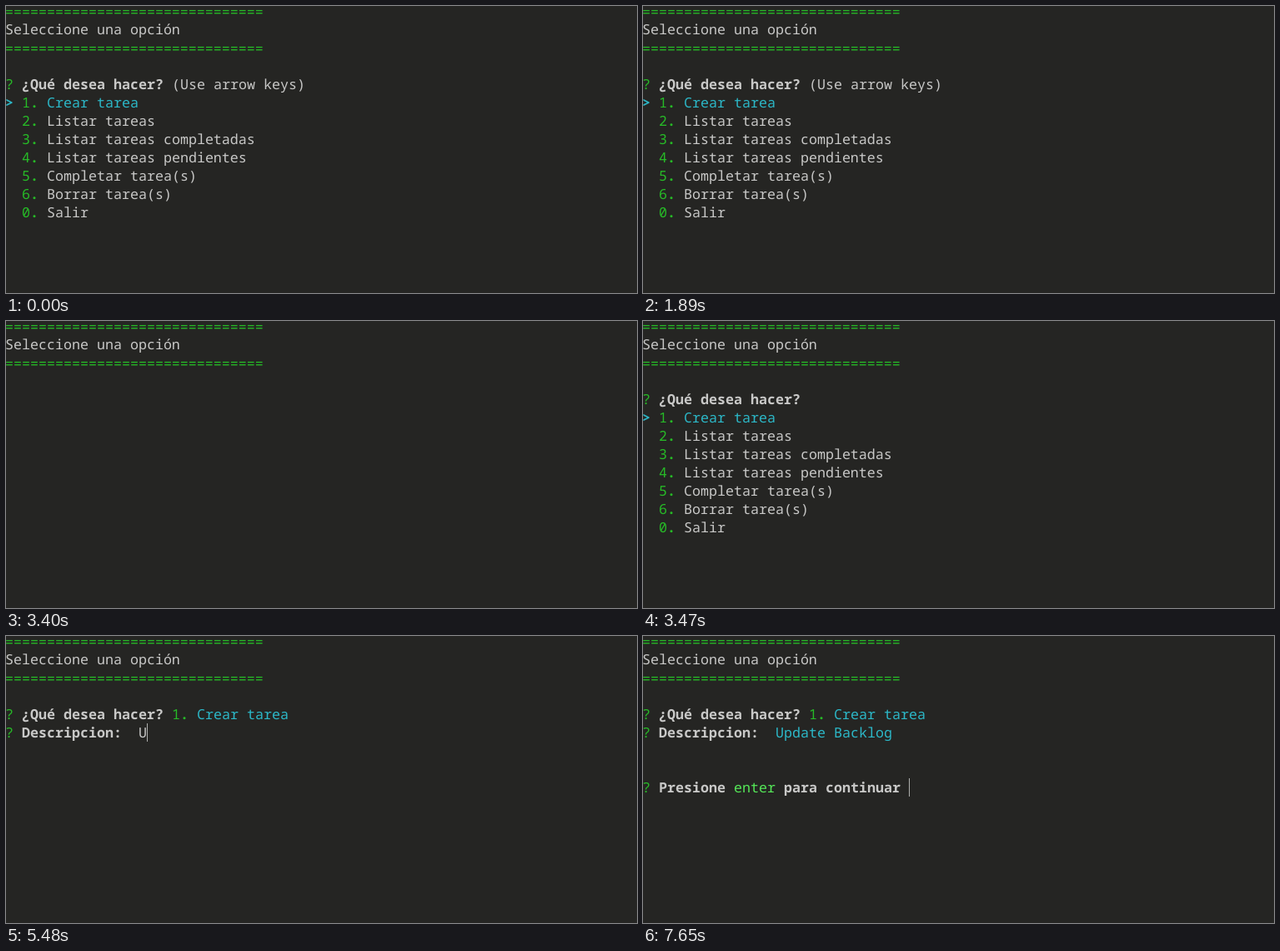
An HTML page that plays this animation: 757 by 345 pixels, repeating every 8000 ms.

```html
<!DOCTYPE html>
<html lang="es">
<head>
<meta charset="utf-8">
<title>Tareas</title>
<style>
  html, body { margin: 0; width: 100%; height: 100%; overflow: hidden; background: #252523; }
  svg { display: block; width: 757px; height: 345px; }
  text { font: 16.667px "Noto Sans Mono", monospace; white-space: pre; text-rendering: geometricPrecision; }
  .fg { fill: #c8c8c7; }
  .bold { fill: #c8c8c7; font-weight: 700; }
  .green { fill: #27bb27; }
  .cyan { fill: #2cb8c8; }
  .bright { fill: #55e858; }
  .strong { font-weight: 700; }
  .medium { font-weight: 500; }
</style>
</head>
<body>
<svg viewBox="0 0 757 345">
  <rect width="757" height="345" fill="#252523"/>
  <g id="screen"></g>
  <rect id="caret" y="105" width="1" height="22" fill="#aeafad"/>
  <circle id="click" cx="544" cy="233" r="12" fill="#8b8a14"/>
  <path id="beam" d="M0 .5h3M4 .5h3M3.5 1v14M0 15.5h3M4 15.5h3" stroke="#e4e4e0" fill="none" shape-rendering="crispEdges"/>
</svg>
<script>
const LOOP = 8000, COL = 10, ROW = 22;
const $ = id => document.getElementById(id);
const screen = $('screen'), caret = $('caret'), click = $('click'), beam = $('beam');

const options = [
  'Crear tarea', 'Listar tareas', 'Listar tareas completadas',
  'Listar tareas pendientes', 'Completar tarea(s)', 'Borrar tarea(s)', 'Salir'
];
const phrase = 'Update Backlog';
const keyTimes = [5480, 5660, 5755, 5850, 5990, 6080, 6170, 6550, 6730, 6835, 6940, 7040, 7220, 7340];

const colX = col => col * COL - 1;
const between = (t, a, b) => t >= a && t < b;
const show = (el, on) => el.setAttribute('visibility', on ? 'visible' : 'hidden');

const run = (row, col, style, text, drop = 0) =>
  `<text class="${style}" x="${colX(col)}" y="${row * ROW + 12 + drop}">${text}</text>`;

const prompt = (row, text) => run(row, 0, 'green', '?') + run(row, 2, 'bold', text);
const rule = row => run(row, 0, 'green', '='.repeat(31), 1);
const number = (row, col, n) => run(row, col, 'green medium', n) + run(row, col + 1, 'green strong', '.');

const header = () => rule(0) + run(1, 0, 'fg', 'Seleccione una opción') + rule(2);

function menu(selected, hint) {
  const items = options.map((name, i) => {
    const row = 5 + i, on = i === selected;
    return (on ? run(row, 0, 'cyan strong', '&gt;') : '') +
      number(row, 2, (i + 1) % options.length) +
      run(row, 5, on ? 'cyan' : 'fg', name);
  });
  return prompt(4, '¿Qué desea hacer?') + (hint ? run(4, 20, 'fg', '(Use arrow keys)') : '') + items.join('');
}

function form(typed, done) {
  return prompt(4, '¿Qué desea hacer?') + number(4, 20, 1) + run(4, 23, 'cyan', options[0]) +
    prompt(5, 'Descripcion:') + run(5, 16, done ? 'cyan' : 'fg', typed) +
    (done ? prompt(8, 'Presione') + run(8, 11, 'bright', 'enter') + run(8, 17, 'bold', 'para continuar') : '');
}

function body(t, typed) {
  if (t < 3020) return menu(0, true);
  if (t < 3400) return menu(1, false);
  if (t < 3470) return '';
  if (t < 4100) return menu(0, false);
  return form(typed, t >= 7650);
}

// The pointer glides in over six sampled positions, then settles by single pixels.
function beamPos(t) {
  if (t >= 1130) return [543, 226];
  if (t >= 880) return [544, 226];
  const left = 1 - Math.min(5, Math.floor((t - 360) / 66)) / 5;
  const ease = left * left;
  return [Math.round(544 + 152 * ease), Math.round(227 + 88 * ease)];
}

let last = '';
function draw(t) {
  const count = keyTimes.filter(k => t >= k).length;
  const html = header() + body(t, phrase.slice(0, count));
  if (html !== last) screen.innerHTML = last = html;

  const done = t >= 7650;
  caret.setAttribute('x', colX(done ? 32 : 16 + count));
  caret.setAttribute('y', (done ? 8 : 5) * ROW - 5);
  show(caret, t >= 4100 && !between(t, 4660, 5160));

  show(click, between(t, 1330, 1450) || between(t, 1540, 1640));
  beam.setAttribute('transform', `translate(${beamPos(t)})`);
  show(beam, between(t, 360, 1890));
}

let start;
function tick(now) {
  start ??= now;
  draw((now - start) % LOOP);
  requestAnimationFrame(tick);
}
draw(0);
requestAnimationFrame(tick);
</script>
</body>
</html>
```
